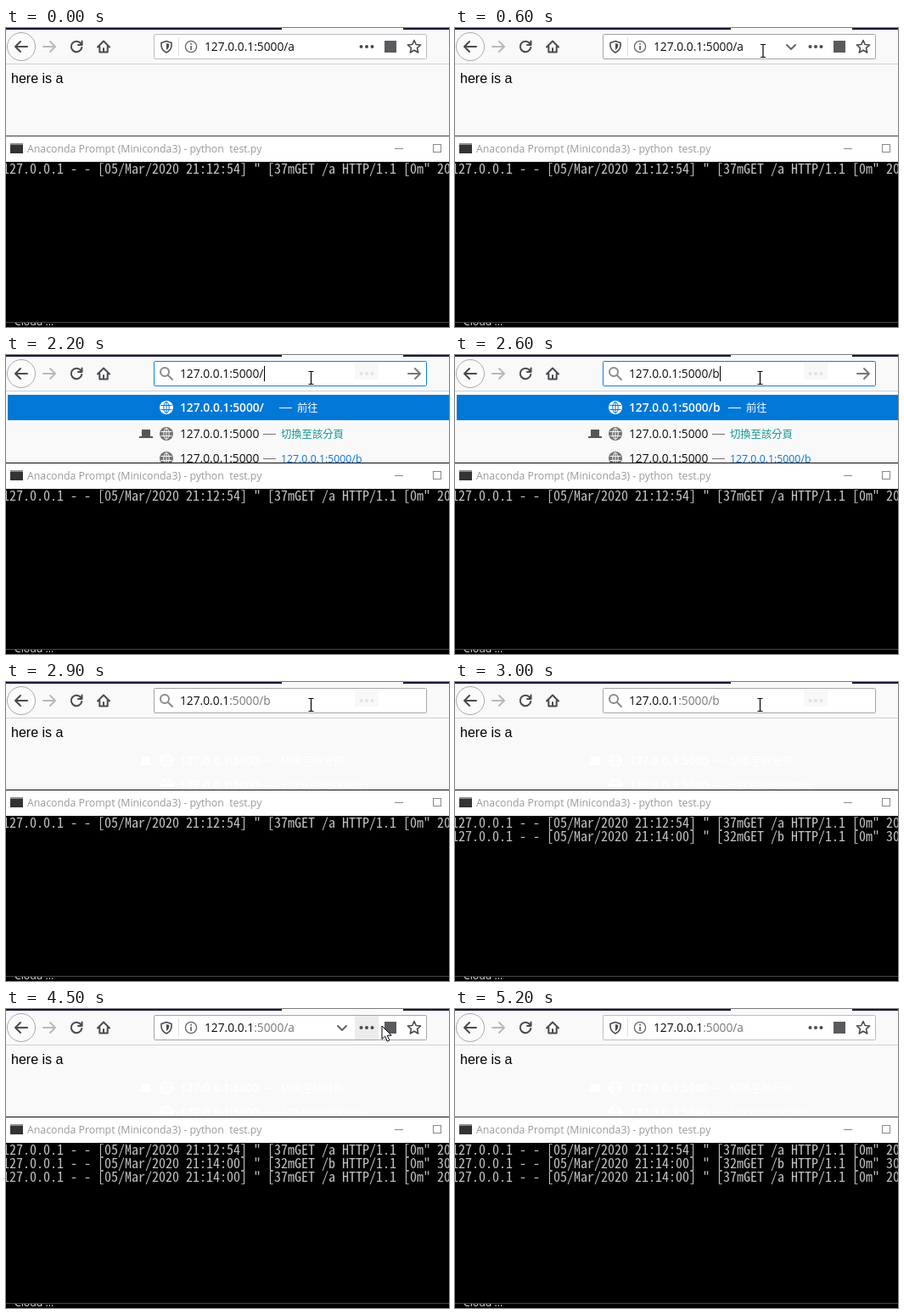
An HTML page for the animation above (5300 ms loop, 522 by 353 pixels).

```html
<!DOCTYPE html>
<html lang="en">
<head>
<meta charset="utf-8">
<style>
html, body { margin: 0; width: 522px; height: 353px; overflow: hidden; }
svg { display: block; }
text { white-space: pre; font: 13.75px 'Open Sans', sans-serif; fill: #0c0c0d; }
.bold { font-weight: 600; }
.small { font: 12.3px 'Open Sans', 'Noto Sans CJK TC', 'Noto Sans CJK', sans-serif; }
.page { font: 16px 'Liberation Sans', Arial, sans-serif; fill: #000; }
.log { font: 16px 'Noto Sans Mono CJK TC', 'Noto Sans Mono CJK JP', monospace; fill: #c4c4c4; }
.icon { fill: none; stroke: #4a4a4f; stroke-width: 2; stroke-linecap: round; stroke-linejoin: round; }
</style>
</head>
<body>
<svg id="stage" width="522" height="353" viewBox="0 0 522 353"></svg>
<script>
const LOOP = 5300, STEP = 100;
const HOST = '127.0.0.1', PORT = ':5000';
const stage = document.getElementById('stage');

const rect = (x, y, w, h, fill, more = '') =>
  `<rect x="${x}" y="${y}" width="${w}" height="${h}" fill="${fill}" ${more}/>`;
const icon = (d, more = '') => `<path class="icon" d="${d}" ${more}/>`;
const text = (x, y, s, cls = '', fill = '') =>
  `<text x="${x}" y="${y}" class="${cls}" ${fill && `style="fill:${fill}"`}>${s}</text>`;
const dots = fill => [418.5, 425, 431.5].map(x => `<circle cx="${x}" cy="22" r="2" fill="${fill}"/>`).join('');

function globe(y, fill, lines) {
  return `<circle cx="189" cy="${y}" r="8" fill="${fill}"/>
    <g fill="none" stroke="${lines}"><ellipse cx="189" cy="${y}" rx="3.2" ry="6.5"/>
    <path d="M182.5 ${y - 2.5}h13m-13 5h13M189 ${y - 6.5}v13"/></g>`;
}

function star() {
  const points = Array.from({ length: 10 }, (_, i) => {
    const r = i % 2 ? 3.7 : 8, a = i * Math.PI / 5;
    return `${(481 + r * Math.sin(a)).toFixed(1)} ${(22.5 - r * Math.cos(a)).toFixed(1)}`;
  });
  return icon(`M${points.join('L')}z`, 'style="stroke-width:1.6"');
}

function navigation() {
  return rect(0, 0, 522, 43, '#f9f9fa') + rect(0, 0, 325, 2, '#17173a') + rect(468, 0, 54, 2, '#17173a') +
    rect(0, 42, 522, 1, '#d0d0d2') +
    '<circle cx="18" cy="22" r="16.5" fill="#fbfbfb" stroke="#a9a9ab"/>' +
    icon('M25 22H11.5M17 16l-6 6 6 6') +
    icon('M44 22h13.5M52 16l6 6-6 6', 'style="stroke:#b9b9bb"') +
    icon('M88 18a6.3 6.3 0 1 0 1.3 5M89.5 15.5v4.5h-4.5') +
    icon('M108 22.5l7-7 7 7M110.3 22v6.5h9.4V22M115 28v-4');
}

// Each entry holds from its time until the next one.
const pointerPath = [
  [0], [100, 500, 22], [200, 470, 30], [300, 435, 34], [400, 406, 34],
  [500, 372, 30, 1], [600, 363, 27, 1], [1300, 359.5, 27, 1],
  [4500, 443, 20], [4600, 462, 20], [4700, 485, 19], [4800, 508, 18], [4900]
];
const pointerAt = t => pointerPath.findLast(p => p[0] <= t);

function pointer([, x, y, beam]) {
  if (!x) return '';
  return beam
    ? `<path d="M${x - 3} ${y - 7.5}h2.5l.5 .5 .5-.5h2.5M${x} ${y - 7}v14M${x - 3} ${y + 7.5}h2.5l.5-.5 .5 .5h2.5" fill="none" stroke="#000" stroke-width="1.2"/>`
    : `<path d="M${x} ${y}v15.5l3.6-3.4 2.6 6 2.6-1.1-2.6-5.8h5z" fill="#fff" stroke="#000"/>`;
}

function addressBar(t, p) {
  const focused = t >= 900 && t < 2900;
  const search = t >= 2200 && t < 3200;
  const hover = p[1] < 496;
  const path = t >= 2600 && t < 3200 ? '/b' : search && t < 2600 ? '/' : '/a';
  const rest = t < 2900 ? '#0c0c0d' : '#77777a';
  let out = rect(174.5, 7.5, 321, 29, '#fff', `stroke="${focused ? '#0a84d8' : hover ? '#a5a5a7' : '#bdbdbf'}" rx="1"`);
  out += text(search ? 205 : 234, 27, `${HOST}<tspan style="fill:${rest}">${PORT}${path}</tspan>`);

  if (search) {
    out += rect(411, 9, 28, 20, '#f8f8f8') + dots('#e2e2e4') +
      '<circle cx="187" cy="20" r="5" fill="none" stroke="#8a8a8d" stroke-width="2"/>' +
      icon('M191 24l5 5', 'style="stroke:#8a8a8d"');
    if (focused) out += icon('M474 22h14M482 16l6 6-6 6', 'style="stroke:#77777a"');
  } else {
    const lit = { 4500: 411, 4600: 439, 4700: 467 }[t];
    if (lit) out += rect(lit, 8, 28, 28, '#ececed');
    out += icon('M189 15.5l6 2v3c0 4.500-2.200 6.500-6 8.500-3.800-2-6-4-6-8.500v-3z', 'style="stroke-width:1.6"') +
      '<path d="M189 18v8c2.500-1.500 3.200-3.500 3.400-7z" fill="#4a4a4f"/>' +
      rect(203, 11, 1, 22, '#e1e1e3') +
      '<circle cx="218" cy="22" r="6.6" fill="none" stroke="#66666a" stroke-width="1.3"/>' +
      rect(217.2, 21, 1.7, 5, '#66666a') + rect(217.2, 18, 1.7, 1.7, '#66666a') +
      dots('#4a4a4f') + rect(446, 15, 14, 14, '#5a5a5e') + star();
    if (hover) out += icon('M391 20l5 5 5-5', 'style="stroke:#66666a"');
  }
  const caret = t >= 1000 && t < 1500 || t >= 1900 && t < 2900;
  if (caret) out += rect(!search ? 340 : path === '/b' ? 312 : 304, 13, 1, 18, '#000');
  return out;
}

function suggestion(y, fill, lines, label, note, noteFill, cls = '') {
  const x = label.length > 14 ? 322 : 303;
  return globe(y, fill, lines) + text(205, y + 5, label, cls, fill === '#737376' ? '#0c0c0d' : fill) +
    rect(x, y, 15, 1, fill) + text(x + 21, y + 5, note, 'small ' + cls, noteFill);
}

const tabIcon = fill => rect(160, 88, 10, 8, fill) + rect(157, 96, 16, 2, fill);

function content(t) {
  const background = rect(0, 43, 522, 84, '#f9f9fa');
  const address = HOST + PORT, switchTab = '切換至該分頁';
  if (t >= 2200 && t < 2900) {
    const typed = address + (t < 2600 ? '/' : '/b');
    return background + rect(2, 47, 520, 30, '#0078d7') +
      suggestion(62, '#fff', '#0078d7', typed, '前往', '#fff', 'bold') + tabIcon('#55555a') +
      suggestion(93, '#737376', '#f9f9fa', address, switchTab, '#12958f') +
      suggestion(122, '#737376', '#f9f9fa', address, address + '/b', '#0a78d0');
  }
  // Faint afterimage left by the closed list.
  const afterimage = t < 2900 ? '' : tabIcon('#fff') +
    suggestion(93, '#fff', '#f9f9fa', address, switchTab, '#fff', 'bold') +
    suggestion(122, '#fff', '#f9f9fa', address, address + '/b', '#fff', 'bold');
  return background + afterimage + text(6, 65, 'here is a', 'page');
}

function terminal(t) {
  const logs = [['12:54', '37', 'a', 20], ['14:00', '32', 'b', 30], ['14:00', '37', 'a', 20]];
  const count = t < 3000 ? 1 : t < 3100 ? 2 : 3;
  const edge = t >= 900 && t < 5200 ? '#0c0c0c' : '#3c3c3c';
  return rect(0, 127, 522, 1, edge) + rect(0, 128, 522, 30, '#fff') +
    rect(5, 136, 15, 12, '#333') + rect(5, 136, 15, 2, '#8c8c8c') +
    text(25, 147, 'Anaconda Prompt (Miniconda3) - python  test.py', 'small', '#999') +
    rect(458, 142, 10, 1, '#888') + rect(503.5, 137.5, 9, 9, 'none', 'stroke="#888"') +
    rect(0, 158, 522, 195, '#000') +
    logs.slice(0, count).map(([time, color, path, status], i) => text(-4, 172 + 16 * i,
      `${HOST} - - [05/Mar/2020 21:${time}] " [${color}mGET /${path} HTTP/1.1 [0m" ${status}`, 'log')).join('') +
    text(10, 351, 'Cloud ...', 'small', '#e4e4e4') + rect(0, 338, 522, 9, '#000') + rect(0, 347, 522, 1, '#484848');
}

function draw(t) {
  const p = pointerAt(t);
  stage.innerHTML = navigation() + content(t) + addressBar(t, p) + terminal(t) + pointer(p);
}

let shown = -1;
function tick() {
  const t = Math.floor(performance.now() % LOOP / STEP) * STEP;
  if (t !== shown) draw(shown = t);
  requestAnimationFrame(tick);
}
tick();
</script>
</body>
</html>
```
